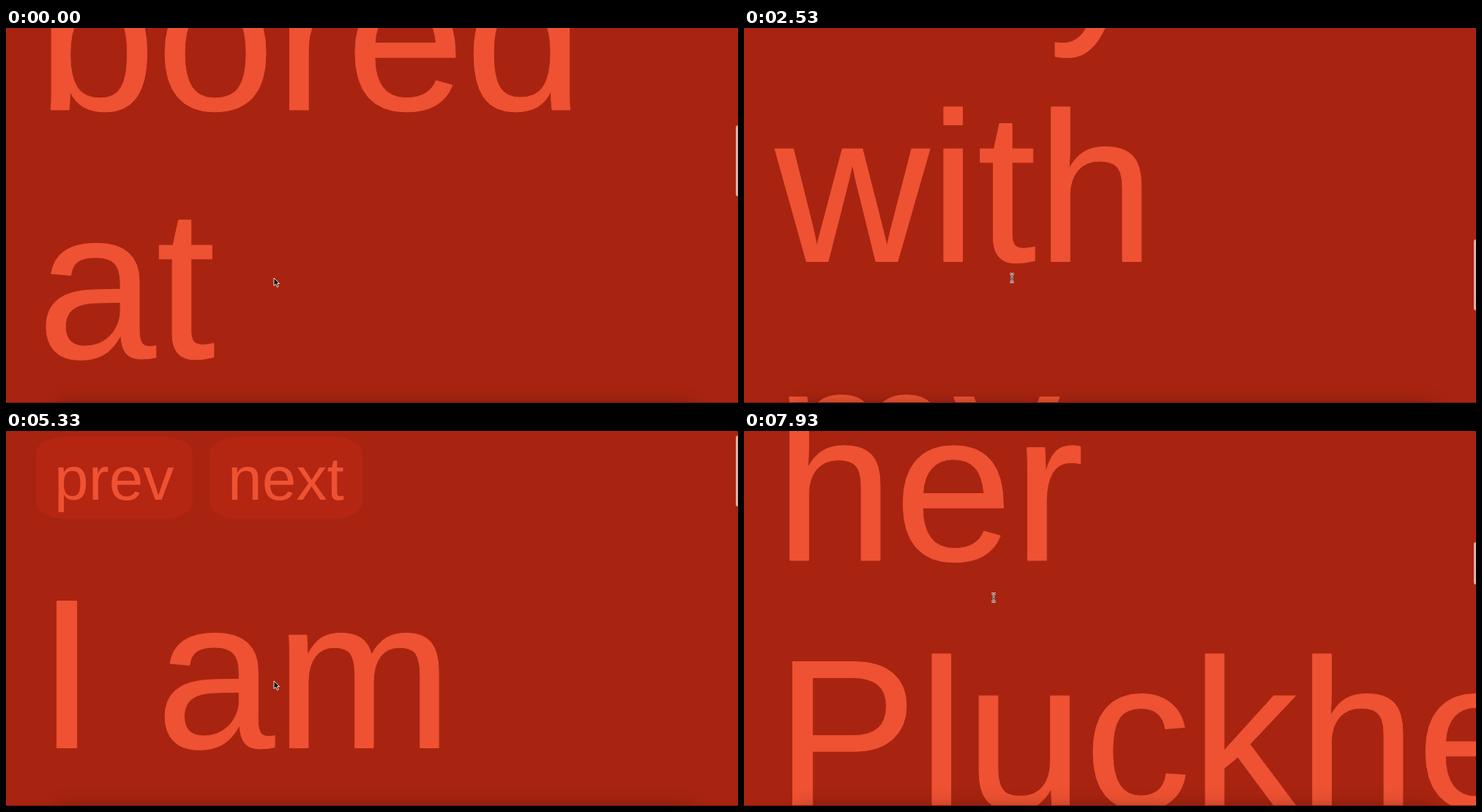
An HTML page that plays this animation: 1000x513 px, repeating every 8 s.

```html
<!DOCTYPE html>
<html lang="en">
<head>
<meta charset="utf-8">
<title>Story scroll</title>
<style>
  html, body { margin: 0; height: 100%; overflow: hidden; background: #a82410; }
  svg { display: block; width: 100vw; height: 100vh; font-family: "Liberation Sans", Arial, sans-serif; }
  .page { fill: #ee5232; font-size: 292px; }
  .page > text { stroke: #ee5232; stroke-width: 1px; }
  .button { font-size: 84px; }
  .button rect { fill: #b42612; }
  .status { font-size: 8px; }
</style>
</head>
<body>
<svg viewBox="0 0 1000 513">
  <filter id="soft" filterUnits="userSpaceOnUse" x="0" y="460" width="1000" height="120">
    <feGaussianBlur stdDeviation="12"/>
  </filter>
  <rect width="1000" height="513" fill="#a82410"/>
  <g id="pages"></g>
  <rect x="70" y="513" width="870" height="60" opacity=".25" filter="url(#soft)"/>
  <rect y="512" width="1000" height="1" fill="#6b1509"/>
  <g id="bars"></g>
  <rect id="thumb" x="997" width="8" rx="3" fill="#dcb0a8"/>
  <path id="arrow" d="M0 0V10.5L2.5 8.3L4.3 12.4L6.2 11.6L4.4 7.6H7.6Z" fill="#000" stroke="#fff" stroke-width=".9"/>
  <g id="beam" fill="none">
    <path d="M-3-5.5H-1L0-4.5L1-5.5H3M0-4.5V4.5M-3 5.5H-1L0 4.5L1 5.5H3M-1.5 1H1.5" stroke="#eee" stroke-width="2.4"/>
    <path d="M-3-5.5H-1L0-4.5L1-5.5H3M0-4.5V4.5M-3 5.5H-1L0 4.5L1 5.5H3M-1.5 1H1.5" stroke="#222" stroke-width=".9"/>
  </g>
</svg>
<script>
const $ = id => document.getElementById(id);
const FPS = 15, FRAMES = 120, SWAP = 93;

// All times below are in ticks of 1/15 s.
const scroll = [[0, 693.5], [11, 1150], [13, 1150], [16, 1386], [26, 1775], [38, 1504.5],
  [52, 1130], [56, 1020.5], [67, 403.5], [84, 0], [100, 0], [111, 800], [119, 1307.5]];
const pointerX = [[0, 366], [83, 366], [90, 341], [119, 341]];
const pointerY = [[0, 342], [83, 342], [90, 99], [91, 99], [95, 228], [119, 228]];

const pages = [
  { lines: ["I am", "bored", "at", "FillyPump", "with", "my"], ratio: 5.2, thumb: 97 },
  { lines: ["She", "lives", "in", "her", "Pluckheron"], ratio: 8.6, thumb: 58 }
];
const shopUrl = "https://www.fillypump.com/locations/ca/mill-valley/655";
const bars = [
  { text: shopUrl, width: 203, on: 11, off: 15 },
  { text: shopUrl, width: 203, on: 57, off: 69.5 },
  { text: "127.0.0.1:5500/DesigninNature/studio/workshops/story-style/3.html", width: 256, on: 88, off: 104 }
];

const button = (x, width, label) => `<g class="button">
  <rect x="${x}" y="40" width="${width}" height="113" rx="${width / 5}" ry="23"/>
  <text x="${x + 25}" y="126">${label}</text></g>`;

$("pages").innerHTML = pages.map(p => `<g class="page">
  ${button(41, 214, "prev")}${button(278, 209, "next")}
  ${p.lines.map((s, i) => `<text x="42.5" y="${466 + i * 339.5}">${s}</text>`).join("")}</g>`).join("");

$("bars").innerHTML = bars.map(b => `<g class="status">
  <rect x="-5" y="503" width="${b.width + 5}" height="15" rx="2" fill="#bfe3e2"/>
  <text x="${b.width - 4}" y="512" text-anchor="end" fill="#222">${b.text}</text></g>`).join("");

const clamp = v => Math.max(0, Math.min(1, v));

// Monotone cubic curve through [time, value] points
function curve(pts, t) {
  const rate = i => pts[i + 1] ? (pts[i + 1][1] - pts[i][1]) / (pts[i + 1][0] - pts[i][0]) : rate(i - 1);
  const slope = i => {
    if (i === 0 || i === pts.length - 1) return rate(i);
    const a = rate(i - 1), b = rate(i);
    return a * b > 0 ? 2 * a * b / (a + b) : 0;
  };
  let i = 0;
  while (i < pts.length - 2 && t >= pts[i + 1][0]) i++;
  const [t0, v0] = pts[i], [t1, v1] = pts[i + 1], h = t1 - t0, u = (t - t0) / h, w = 1 - u;
  return v0 * w * w * (1 + 2 * u) + v1 * u * u * (3 - 2 * u)
    + h * u * w * (slope(i) * w - slope(i + 1) * u);
}

function draw(t) {
  const current = t < SWAP ? 0 : 1, y = curve(scroll, t), page = pages[current];
  [...$("pages").children].forEach((g, i) => {
    g.style.display = i === current ? "" : "none";
    g.setAttribute("transform", `translate(0 ${-y})`);
  });
  [...$("bars").children].forEach((g, i) => {
    const { on, off } = bars[i];
    g.style.opacity = clamp((t - on) / 1.5) * clamp((off - t) / 3.5);
  });

  $("thumb").setAttribute("y", y / page.ratio);
  $("thumb").setAttribute("height", page.thumb);
  $("thumb").style.opacity = current ? clamp((t - 100) / 2) : clamp((91 - t) / 4);

  const isArrow = t < 14 || t >= 57 && t < 95;
  $("arrow").style.display = isArrow ? "" : "none";
  $("beam").style.display = isArrow ? "none" : "";
  const place = `translate(${curve(pointerX, t)} ${curve(pointerY, t)})`;
  $("arrow").setAttribute("transform", place);
  $("beam").setAttribute("transform", place);
}

function loop() {
  draw(Math.floor((performance.now() + 4) * FPS / 1000) % FRAMES);
  requestAnimationFrame(loop);
}
loop();
</script>
</body>
</html>
```
